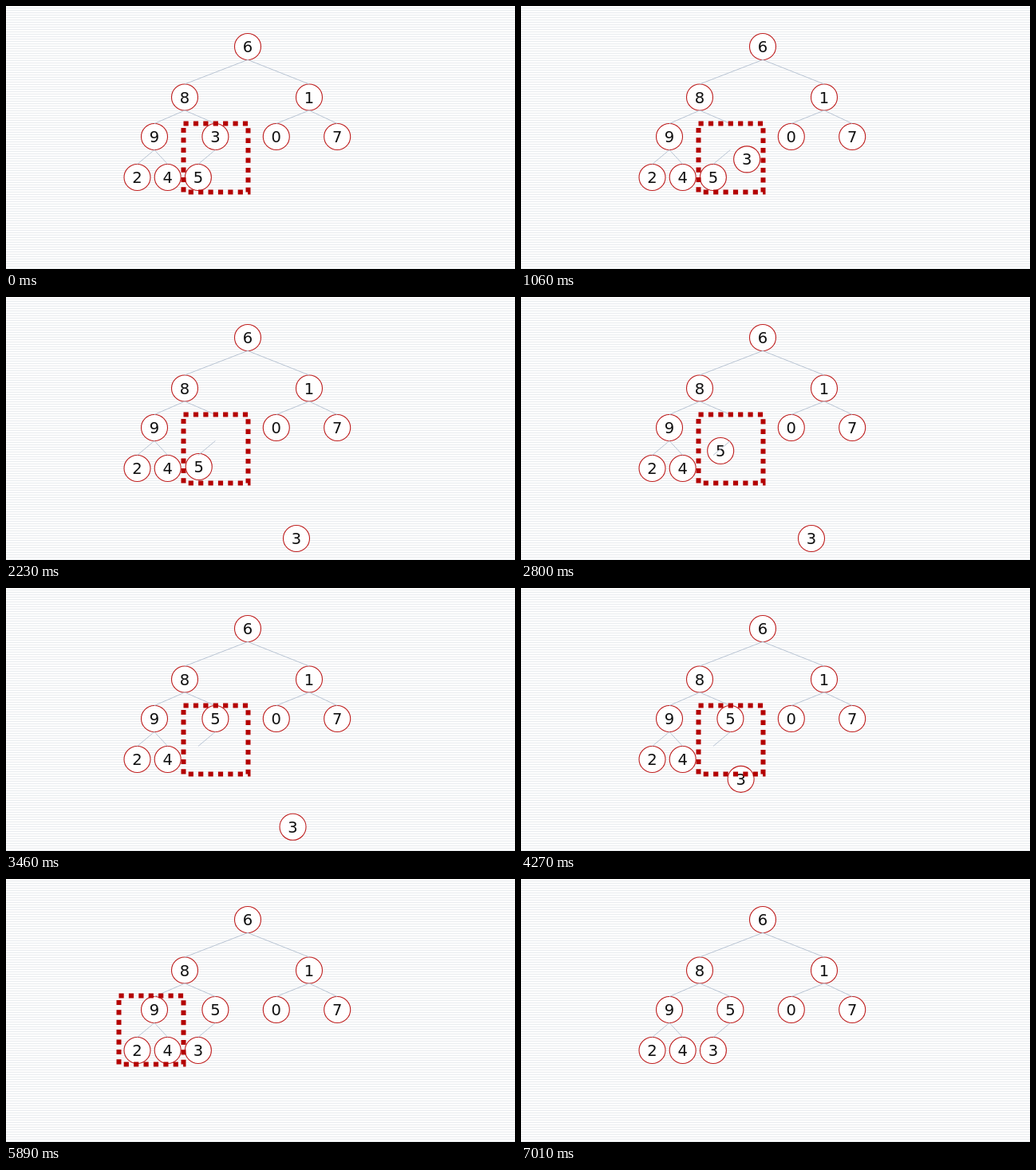
Recreate the animation shown at these times as an HTML page. Size 638 px wide and 330 px high, loop 8000 ms.

```html
<!DOCTYPE html>
<html lang="en">
<head>
<meta charset="utf-8">
<title>Heap sift-down</title>
<style>
  html, body { margin: 0; width: 100%; height: 100%; overflow: hidden; }
  body { background: repeating-linear-gradient(#fdfdfd 0 2px, #eaedf0 2px 3px); }
  svg { display: block; width: 638px; height: 330px; }
  circle { fill: #fff; stroke: #be1e1e; stroke-width: 1.1; }
  text { font: 19.5px "DejaVu Sans", sans-serif; text-anchor: middle; fill: #111; }
  path { fill: none; stroke: #b9c5d4; }
  rect { fill: none; stroke: #b40000; stroke-width: 6; stroke-dasharray: 6.2; }
</style>
</head>
<body>
<svg viewBox="0 0 638 330">
  <g id="nodes"></g>
  <path id="edges"/>
  <rect id="frame" width="81" height="86"/>
</svg>
<script>
const LOOP = 8000, RADIUS = 16.5;
const FIRST_TICK = 370, TICK = 132; // the motion advances in visible steps

const levels = [
  { labels: "6", x: 303, gap: 0, y: 51 },
  { labels: "81", x: 224, gap: 156, y: 114.5 },
  { labels: "9307", x: 186, gap: 76.4, y: 164 },
  { labels: "245", x: 164.5, gap: 38.2, y: 215 }
];
const tree = levels.flatMap(({ labels, x, gap, y }) =>
  [...labels].map((label, i) => ({ label, x: x + gap * i, y })));

const parent = tree[4], child = tree[9], aside = { x: 364, y: 303 };
const easeInOut = u => (1 - Math.cos(Math.PI * u)) / 2;
const easeIn = u => u * u;

// Start and end are counted in ticks
const moves = [
  { node: 4, from: parent, to: aside, start: 1.3, end: 13.7, ease: easeInOut },
  { node: 9, from: child, to: parent, start: 12.25, end: 21, ease: easeIn },
  { node: 4, from: aside, to: child, start: 21.6, end: 33.1, ease: easeInOut }
];

const byId = id => document.getElementById(id);

function add(container, tag, attributes = {}) {
  const element = document.createElementNS("http://www.w3.org/2000/svg", tag);
  for (const name in attributes) element.setAttribute(name, attributes[name]);
  return container.appendChild(element);
}

const place = (element, x, y) => element.setAttribute("transform", `translate(${x} ${y})`);

const groups = tree.map(({ label, x, y }) => {
  const group = add(byId("nodes"), "g");
  add(group, "circle", { r: RADIUS });
  add(group, "text", { y: 7 }).textContent = label;
  place(group, x, y);
  return group;
});

byId("edges").setAttribute("d", tree.slice(1).map(({ x, y }, i) => {
  const top = tree[i >> 1];
  return `M${top.x} ${top.y + RADIUS}L${x} ${y - RADIUS}`;
}).join(""));

function draw(now) {
  const time = now % LOOP;
  const tick = Math.floor((time - FIRST_TICK) / TICK);

  place(groups[4], parent.x, parent.y);
  place(groups[9], child.x, child.y);
  for (const { node, from, to, start, end, ease } of moves) {
    if (tick < start) continue;
    const progress = ease(Math.min(1, (tick - start) / (end - start)));
    place(groups[node], from.x + (to.x - from.x) * progress, from.y + (to.y - from.y) * progress);
  }

  const onRight = time < 4930, onLeft = time >= 5890 && time < 7010;
  byId("frame").style.display = onRight || onLeft ? "" : "none";
  place(byId("frame"), onRight ? 222.5 : 141.5, onRight ? 147.5 : 146.5);
  requestAnimationFrame(draw);
}
draw(0);
</script>
</body>
</html>
```
